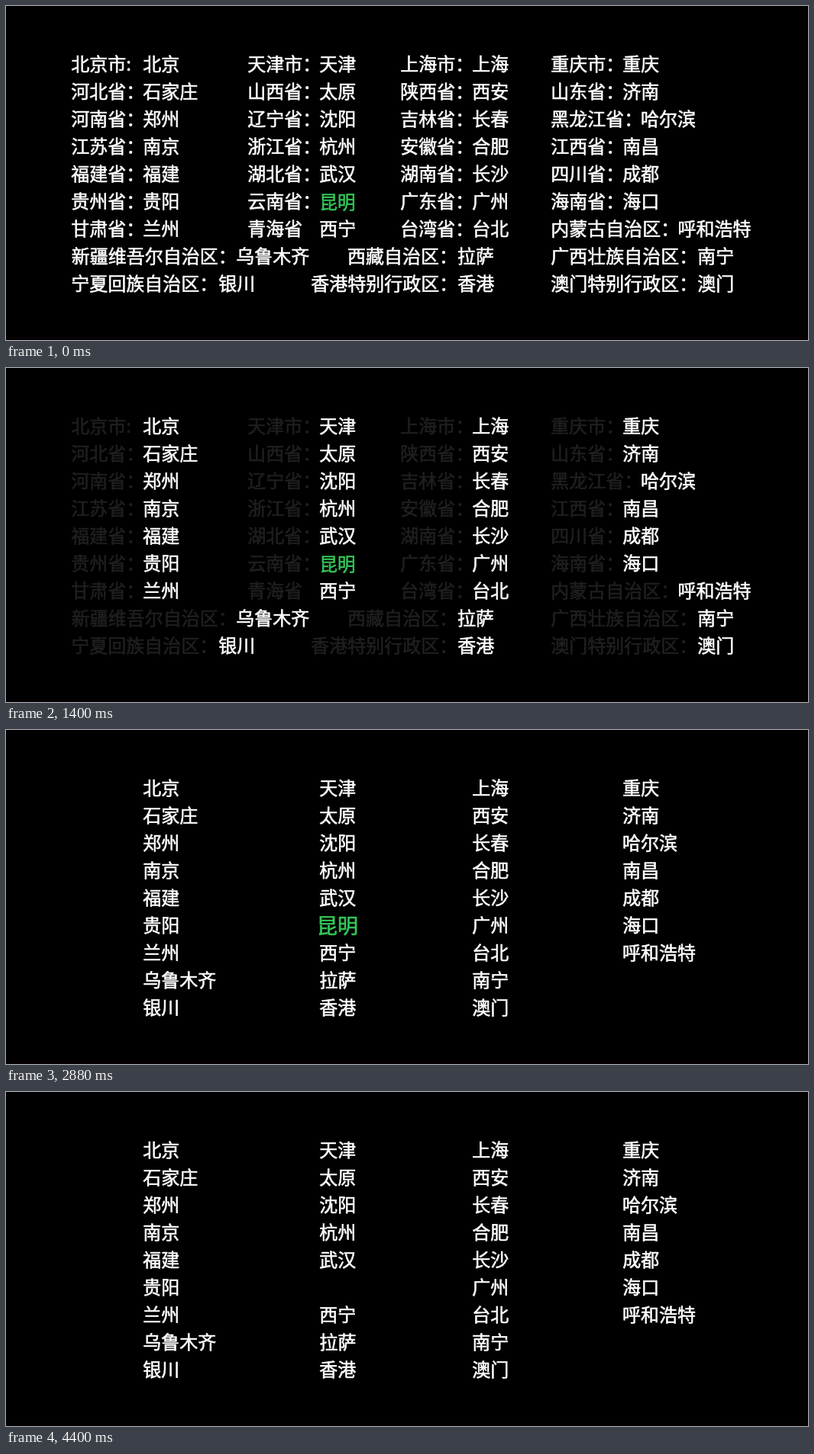
Animation, 1050 px wide and 438 px high, one loop 6000 ms. Source, as an HTML page:

```html
<!DOCTYPE html>
<html lang="zh-CN">
<head>
<meta charset="utf-8">
<title>省会列表</title>
<style>
  html, body { margin: 0; width: 100%; height: 100%; overflow: hidden; background: #000; }
  svg { display: block; width: 100%; height: 100%; }
  /* the thin stroke gives a medium weight */
  text {
    font: 400 24px "Noto Sans CJK SC", "Noto Sans CJK", "Noto Sans SC", sans-serif;
    fill: #fff; stroke: #fff; stroke-width: 0.6px; white-space: pre;
  }
  #hero text { font-size: 23.5px; fill: #34c759; stroke: #34c759; text-anchor: middle; }
</style>
</head>
<body>
<svg viewBox="0 0 1050 438">
  <defs><clipPath id="slide"><rect width="1050" height="434"/></clipPath></defs>
  <rect width="1050" height="438"/>
  <rect y="434" width="1050" height="4" fill="#050102"/>
  <g id="labels"></g>
  <g id="cities"></g>
  <g clip-path="url(#slide)"><g id="hero"><text y="9">昆明</text></g></g>
</svg>
<script>
const LOOP = 6000, STEP = 40, ROW = 36, BASE = 85;
const LABEL_X = [85.3, 316.3, 516.3, 713.3];
const CITY_X = [179.3, 410.3, 610.3, 807.3];

// One line per row: "label|city", column by column
const rows = `北京市:|北京 天津市：|天津 上海市：|上海 重庆市：|重庆
河北省：|石家庄 山西省：|太原 陕西省：|西安 山东省：|济南
河南省：|郑州 辽宁省：|沈阳 吉林省：|长春 黑龙江省：|哈尔滨
江苏省：|南京 浙江省：|杭州 安徽省：|合肥 江西省：|南昌
福建省：|福建 湖北省：|武汉 湖南省：|长沙 四川省：|成都
贵州省：|贵阳 云南省：| 广东省：|广州 海南省：|海口
甘肃省：|兰州 青海省|西宁 台湾省：|台北 内蒙古自治区：|呼和浩特
新疆维吾尔自治区：|乌鲁木齐 西藏自治区：|拉萨 广西壮族自治区：|南宁
宁夏回族自治区：|银川 香港特别行政区：|香港 澳门特别行政区：|澳门`.split("\n");

// Long labels: own label x, then the city's x before and after the slide
const wide = {
  黑龙江省: [713.3, 831, 807],
  内蒙古自治区: [713.3, 879.5, 807],
  新疆维吾尔自治区: [85.7, 301.3, 179.3],
  西藏自治区: [447, 591, 410.5],
  广西壮族自治区: [713.3, 905.3, 610.3],
  宁夏回族自治区: [85.3, 278.3, 179.3],
  香港特别行政区: [399.3, 591.3, 410.3],
  澳门特别行政区: [713.3, 905.3, 610.3]
};

const $ = id => document.getElementById(id);
const clamp = v => Math.min(1, Math.max(0, v));
const smooth = v => v * v * (3 - 2 * v);
const mix = (a, b, k) => a + (b - a) * k;

function addText(parent, str, x, y) {
  const el = document.createElementNS("http://www.w3.org/2000/svg", "text");
  el.textContent = str;
  el.setAttribute("x", x);
  el.setAttribute("y", y);
  parent.appendChild(el);
  return el;
}

const movers = [];
rows.forEach((row, r) => row.split(" ").forEach((cell, c) => {
  const [label, city] = cell.split("|");
  const y = BASE + r * ROW;
  const [lx, from, to] = wide[label.replace("：", "")] || [LABEL_X[c], CITY_X[c], CITY_X[c]];
  addText($("labels"), label, lx, y);
  if (!city) return;
  const el = addText($("cities"), city, from, y);
  if (from !== to) movers.push({ el, from, to });
}));

function heroPose(t) {
  const pulse = Math.min(Math.max(t - 2200, 0), 680);
  const scale = 1 + 0.97 * Math.sin(Math.PI * pulse / 715);
  const fly = Math.max(t - 3200, 0);
  const angle = 80 * smooth(clamp(fly / 1200));
  let x, y;
  if (fly <= 640) {
    const u = fly / 640;
    x = 434 + 574 * u ** 1.39;
    y = 256.5 + 146.5 * u ** 3;
  } else {
    // rebound to the left, then out past the lower edge
    const v = clamp((fly - 640) / 560);
    x = 1008 - 153 * v;
    y = 403 - 332 * v + 394 * v * v;
  }
  return { x, y, angle, scale };
}

function render(t) {
  $("labels").setAttribute("opacity", t >= 1440 ? 0 : 1 - clamp((t - 800) / 680));
  const slide = clamp((t - 1600) / 400);
  for (const m of movers) m.el.setAttribute("x", mix(m.from, m.to, slide));
  const p = heroPose(t);
  $("hero").setAttribute("transform", `translate(${p.x} ${p.y}) rotate(${p.angle}) scale(${p.scale})`);
  $("hero").setAttribute("visibility", t < 4400 ? "visible" : "hidden");
}

const start = performance.now();
function tick() {
  const t = (performance.now() - start) % LOOP;
  render(Math.floor(t / STEP) * STEP);
  requestAnimationFrame(tick);
}
render(0);
requestAnimationFrame(tick);
</script>
</body>
</html>
```
